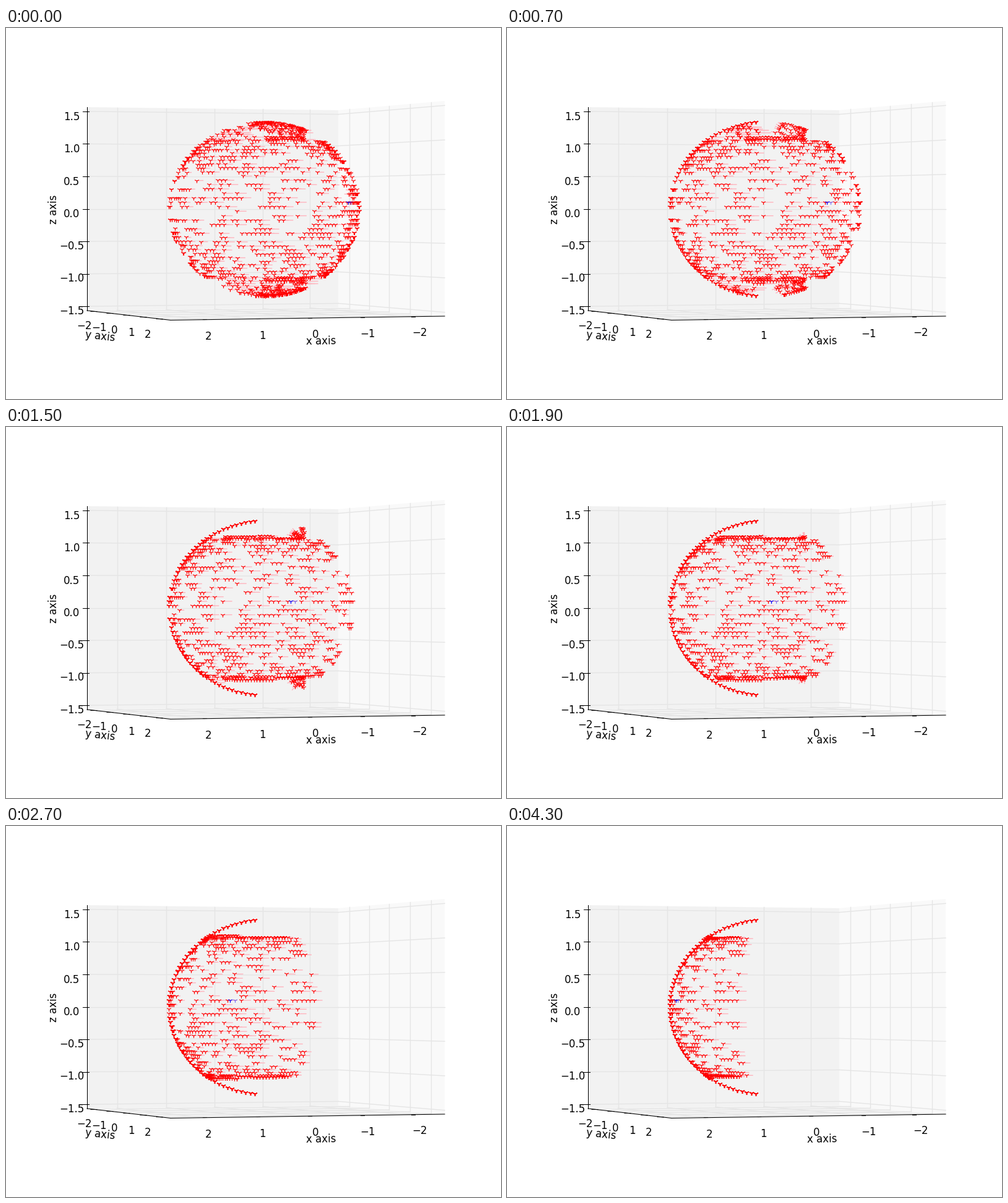
Write a matplotlib script that moves like this. It is 800 px wide and 600 px high and loops after 4400 ms.

```python
import numpy as np
import matplotlib.pyplot as plt
from matplotlib.animation import FuncAnimation
from matplotlib.collections import LineCollection
from matplotlib.path import Path

FRAMES, INTERVAL = 44, 100
CX, CY, RX, RZ = 417, 292.7, 154, 141
RATE = np.radians(3.08)      # turn per frame
STEP = 0.05                  # grid spacing in latitude and longitude
TAIL = np.radians(-25)       # rearmost longitude at the start
JOIN = np.radians(48)        # where cap points enter the rim stream
rng = np.random.default_rng(8)

plt.rcParams["font.family"] = "DejaVu Sans"
fig = plt.figure(figsize=(8, 6), dpi=100, facecolor="white")
ax = fig.add_axes([0, 0, 1, 1])
ax.set_xlim(0, 800)
ax.set_ylim(600, 0)
ax.axis("off")


# ---- box, grid and labels ----
def line(x0, y0, x1, y1, color="black", lw=0.75, z=2):
    ax.plot([x0, x1], [y0, y1], color=color, lw=lw, zorder=z)


def grid(*p):
    line(*p, color="#e5e5e5", lw=1.0, z=1)


def label(x, base, s, rot=0):
    s = str(s).replace("-", "\u2212")
    ax.text(x, base, s, fontsize=12, ha="center", va="baseline",
            rotation=rot, rotation_mode="anchor", zorder=3)


def lerp(x, x0, v0, x1, v1):
    return v0 + (v1 - v0) * (x - x0) / (x1 - x0)


# x and half height of each upright edge of the box
MID = 292.5
LEFT, BACK, RIGHT, FRONT = (131, 164.5), (537, 159.5), (709, 174.5), (266, 180)


def pane(points, color):
    ax.fill(*zip(*points), color=color, lw=0, zorder=0)


def wall(a, b, color):
    pane([(a[0], MID - a[1]), (b[0], MID - b[1]),
          (b[0], MID + b[1]), (a[0], MID + a[1])], color)


wall(LEFT, BACK, "#f2f2f2")
wall(BACK, RIGHT, "#f9f9f9")
pane([(x, MID + h) for x, h in (LEFT, BACK, RIGHT, FRONT)], "#f4f4f4")

for front, back in zip([321, 407, 491, 576, 658], [179.5, 259, 337, 415, 491]):
    h = lerp(back, *LEFT, *BACK)
    y = MID + lerp(front, *FRONT, *RIGHT)
    grid(back, MID - h, back, MID + h)
    grid(back, MID + h, front, y)
    line(front - 3, y - 0.5, front + 3, y - 0.5)
for side, back in zip([142, 168, 195, 222, 248], [555, 587, 619, 653, 687]):
    h = lerp(back, *BACK, *RIGHT)
    y = MID + lerp(side, *LEFT, *FRONT)
    grid(back, MID - h, back, MID + h)
    grid(back, MID + h, side, y)
    line(side - 5, y, side + 5, y + 0.3)
for i in range(7):
    z = 1.5 - 0.5 * i
    ys = [MID - h * z / 1.565 for _, h in (LEFT, BACK, RIGHT)]
    grid(131, ys[0], 537, ys[1])
    grid(537, ys[1], 709, ys[2])
    line(124, ys[0], 134, ys[0])
    label(106, 149 + 52.3 * i, f"{z:.1f}")

line(131, 128, 131, 457)
line(131, 457, 266, 472.5)
line(266, 472.5, 709, 466)

for i, x in enumerate([327, 414, 500.5, 585, 668]):
    label(x, 504 - 1.4 * i, 2 - i)
for i, x in enumerate([126, 151, 175, 202, 229]):
    label(x, 487 + 3.5 * i, i - 2)
label(509, 512, "x axis", 0.8)
label(152, 504, "y axis", -6.5)
label(82, 293, "z axis", 90)


# ---- points ----
def project(lat, lon):
    depth = 1 + 0.035 * np.sin(lon) * np.cos(lat)
    return CX + RX * np.cos(lat) * np.cos(lon), CY - RZ * np.sin(lat) * depth


def runs(n, start, stay=0.5):
    """Random on/off slots that tend to come in short runs."""
    on, out = False, []
    for r in rng.random(n):
        on = r < (stay if on else start)
        out.append(on)
    return np.array(out)


band_lat, band_lon = [], []
slots = np.arange(TAIL, np.pi, STEP)
for lat in (np.arange(-18, 18) + 0.5) * STEP:
    picked = slots[runs(len(slots), 0.2 + 0.25 * lat ** 2)]
    band_lat += [lat] * len(picked)
    band_lon += list(picked)
band_lat, band_lon = np.array(band_lat), np.array(band_lon)

# cap points on the left sweep quickly to the final meridian
cap_rows = (np.arange(18, 30) + 0.5) * STEP
sweep_lat = np.repeat(np.concatenate([cap_rows, -cap_rows]), 9)
sweep_x0 = CX + RX * np.cos(sweep_lat) * rng.uniform(-1, 0.85, len(sweep_lat))

# cap points on the right run down to the rim, then follow it round
N = 280
sign = np.where(np.arange(N) % 2, 1, -1)
enter = rng.integers(-13, 22, N)
rim_lat = np.where((enter < 5) & (rng.random(N) < 0.5), 0.94, 0.9)
heading = np.radians(rng.uniform(193, 275, N))

BLUE_LAT, BLUE_LON = 0.075, np.radians(27.7)


def turn(lon, t):
    return np.minimum(lon + RATE * t, np.pi)


def stream(t):
    wait = np.maximum(enter - t, 0)
    x, y = project(rim_lat, turn(JOIN, np.maximum(t - enter, 0)))
    x = x + 3.5 * wait * np.cos(heading)
    y = y + 3.5 * wait * np.sin(heading)
    top = CY - RZ * np.sqrt(1 - ((x - CX) / RX) ** 2)
    y = np.maximum(y, top)
    return x, np.where(sign > 0, y, 2 * CY - y)


def sweep(t):
    edge = CX - RX * np.cos(sweep_lat)
    return np.maximum(sweep_x0 - 10 * t, edge), CY - RZ * np.sin(sweep_lat)


def places(t):
    parts = [project(band_lat, turn(band_lon, t)), sweep(t), stream(t)]
    return np.concatenate([np.column_stack(p) for p in parts])


# flat three-armed mark
tri = Path([(0, 0), (0, -1), (0, 0), (1, 0.5), (0, 0), (-1, 0.5)],
           [Path.MOVETO, Path.LINETO] * 3)
mark = dict(marker=tri, ls="none", ms=4.9, mew=0.85)
trails = LineCollection([], colors="#ffb4be", linewidths=1.0, zorder=4)
ax.add_collection(trails)
red, = ax.plot([], [], color="red", zorder=5, **mark)
ghost, = ax.plot([], [], color="blue", alpha=0.5, zorder=6, **mark)
blue, = ax.plot([], [], color="blue", zorder=7, **mark)


def draw(i):
    now = places(i)
    trails.set_segments(np.stack([now, places(i - 1), places(i - 2)], axis=1))
    red.set_data(now[:, 0], now[:, 1])
    for dot, t in ((blue, i), (ghost, i - 1)):
        x, y = project(BLUE_LAT, turn(BLUE_LON, t))
        dot.set_data([x], [y])
    return trails, red, ghost, blue


anim = FuncAnimation(fig, draw, frames=FRAMES, interval=INTERVAL,
                     init_func=lambda: draw(0), repeat=True, blit=False)
plt.show()
```
